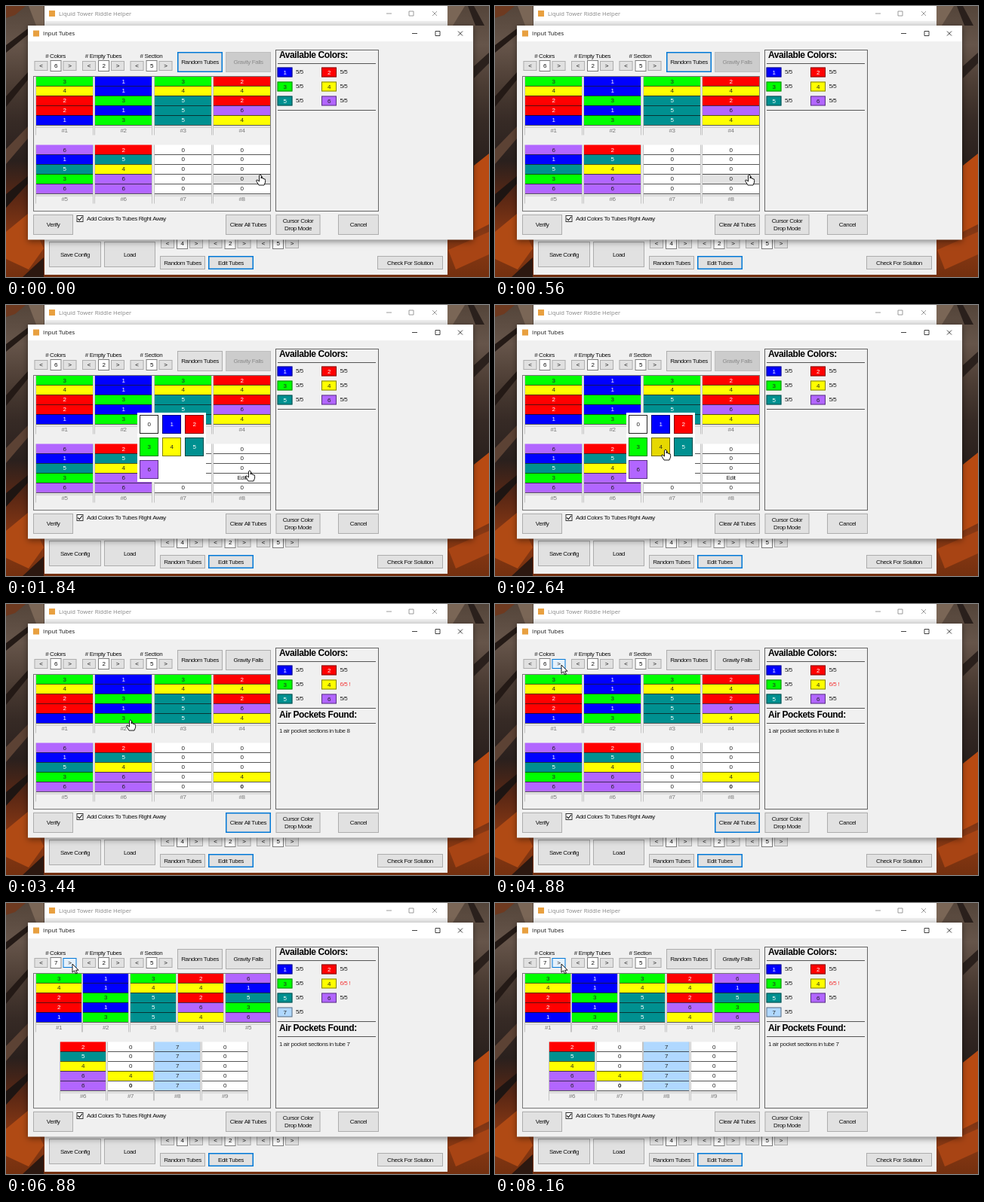
Write an HTML page with a canvas that moves like this. It is 640 px wide and 360 px high and loops after 8400 ms.

```html
<!DOCTYPE html>
<html lang="en">
<head>
<meta charset="utf-8">
<title>Input Tubes</title>
<style>
html, body { margin: 0; width: 100%; height: 100%; overflow: hidden; }
canvas { display: block; width: 640px; height: 360px; }
</style>
</head>
<body>
<canvas id="stage" width="640" height="360"></canvas>
<script>
const ctx = document.getElementById('stage').getContext('2d');
const LOOP = 8400, STEP = 80;
const POPUP_OPEN = 1200, POPUP_CLOSE = 2720, FILLED = 2800, HOVER = 4160, CLICK = 5280, RELAYOUT = 5760, DONE = 6160;
const SANS = '"Liberation Sans", Arial, sans-serif';
const TITLE = '"Open Sans", sans-serif';
const COLORS = ['#fff', '#0000ff', '#ff0000', '#00ff00', '#ffff00', '#009090', '#b266ff', '#b0d8ff'];
const ink = n => [1, 2, 5].includes(n) ? '#fff' : '#222';

function rect(x, y, w, h, fill, stroke, line = 1) {
  if (fill) { ctx.fillStyle = fill; ctx.fillRect(x, y, w, h); }
  if (stroke) {
    ctx.strokeStyle = stroke;
    ctx.lineWidth = line;
    ctx.strokeRect(x + line / 2, y + line / 2, w - line, h - line);
  }
}

function text(s, x, y, { color = '#111', align = 'center', size = 8, weight = '', family = SANS, spacing = -0.4 } = {}) {
  ctx.font = `${weight} ${size}px ${family}`;
  ctx.letterSpacing = spacing + 'px';
  ctx.textAlign = align;
  ctx.textBaseline = 'middle';
  ctx.fillStyle = color;
  ctx.fillText(s, x, y + 0.5);
}

function path(points, fill) {
  ctx.beginPath();
  for (let i = 0; i < points.length; i += 2) ctx.lineTo(points[i], points[i + 1]);
  ctx.closePath();
  ctx.fillStyle = fill;
  ctx.fill();
}

function button(label, x, y, w, h, state = '') {
  const focus = state === 'focus', off = state === 'off', hover = state === 'hover';
  rect(x, y, w, h, off ? '#cccccc' : hover ? '#e5f1fb' : '#e1e1e1',
    focus || hover ? '#0078d7' : off ? '#bfbfbf' : '#adadad', focus ? 1.5 : 1);
  const lines = label.split('\n');
  lines.forEach((s, i) => text(s, x + w / 2, y + h / 2 + (i - (lines.length - 1) / 2) * 9.5,
    { color: off ? '#8c8c8c' : '#111' }));
}

function spinner(x, y, value, hover) {
  button('<', x, y, 18, 13);
  rect(x + 21, y - 1, 15, 15, '#fff', '#7a7a7a');
  text(value, x + 28.5, y + 6.5);
  button('>', x + 38, y, 18, 13, hover ? 'hover' : '');
}

function windowBar(title, x, y, w, h, icon, buttons, color) {
  rect(x, y, w, h, '#fff');
  rect(icon, y + h / 2 - 4, 8, 8, '#e8a040');
  text(title, icon + 13, y + h / 2, { align: 'left', size: 7.7, family: TITLE, color, spacing: 0 });
  const [a, b, c] = buttons, m = y + h / 2;
  ctx.strokeStyle = color;
  ctx.lineWidth = 0.8;
  ctx.beginPath();
  ctx.moveTo(a - 3, m); ctx.lineTo(a + 4, m);
  ctx.rect(b - 3, m - 3, 6, 6);
  ctx.moveTo(c - 3, m - 3); ctx.lineTo(c + 3, m + 3);
  ctx.moveTo(c + 3, m - 3); ctx.lineTo(c - 3, m + 3);
  ctx.stroke();
}

function wallpaper() {
  const g = ctx.createLinearGradient(0, 0, 0, 360);
  ['#54453a', '#66554a', '#4c3d34', '#362a25', '#2a201d', '#5c2814', '#8c3a14', '#74300f']
    .forEach((c, i) => g.addColorStop(i / 7, c));
  rect(0, 0, 640, 360, g);
  path([0, 0, 26, 0, 12, 12, 0, 16], '#6e3a20');
  path([30, 0, 50, 0, 50, 26, 40, 26], '#7a6656');
  path([0, 52, 29, 30, 29, 38, 0, 62], '#241a16');
  path([0, 120, 29, 88, 29, 98, 0, 134], '#241a16');
  path([0, 190, 29, 160, 29, 176, 0, 210], '#5c4234');
  path([0, 250, 29, 226, 29, 236, 0, 268], '#1e1512');
  path([0, 300, 29, 276, 50, 322, 30, 350, 0, 336], '#b04a14');
  path([22, 360, 50, 334, 50, 360], '#2c1810');
  path([585, 0, 608, 0, 592, 26, 585, 26], '#7a6656');
  path([612, 0, 620, 0, 634, 26, 622, 26], '#2a201c');
  path([620, 80, 640, 62, 640, 76, 620, 96], '#2a201c');
  path([620, 212, 640, 196, 640, 290, 620, 300], '#b84a12');
  path([586, 324, 640, 300, 640, 330, 596, 350], '#a84414');
}

function backWindow() {
  rect(51, 0, 534, 357, '#f0f0f0');
  windowBar('Liquid Tower Riddle Helper', 51, 0, 534, 20, 57, [507, 537, 568], '#858585');
  [['4', 205], ['2', 268.5], ['5', 332]].forEach(([v, x]) => spinner(x, 309, v));
  button('Save Config', 57, 313, 69, 34);
  button('Load', 130, 313, 68, 34);
  button('Random Tubes', 204, 332, 60, 18);
  button('Edit Tubes', 268, 332, 60, 18, 'focus');
  button('Check For Solution', 492, 332, 87, 18);
}

function tube(cells, label, x, y, w, center, hot) {
  const pitch = 12.9;
  rect(x - 1, y, 1, 78, '#c4c4c4');
  rect(x + w, y, 1, 78, '#c4c4c4');
  [...cells].forEach((c, i) => {
    const top = y + i * pitch, n = c === 'E' ? 0 : +c;
    rect(x, top, w, pitch, i === hot ? '#e3e3e3' : COLORS[n]);
    text(c === 'E' ? 'Edit' : c, center, top + 6.3,
      { color: ink(n), weight: cells === '00040' && i === 4 ? 'bold' : '' });
  });
  for (let i = 1; i <= cells.length; i++) rect(x, Math.round(y + i * pitch), w, 1, 'rgba(0,0,0,.65)');
  rect(x, y + 67, w, 1, '#c4c4c4');
  if (label) text(label, center, y + 72, { color: '#777' });
}

function tubes(t) {
  const first = ['34221', '11313', '34555', '24264', '61536', '25466'];
  const wide = t < RELAYOUT, loading = !wide && t < DONE;
  let rest;
  if (wide) rest = ['00000', t >= FILLED ? '00040' : t >= POPUP_OPEN ? '000E0' : '00000'];
  else rest = loading ? ['00000', '00040', '00000'] : ['00040', '77777', '00000'];
  const perRow = wide ? 4 : 5, pitch = wide ? 78.6 : 62.9, w = wide ? 75 : 60;
  // Captions keep the old tube width until the new layout has settled.
  const captionWidth = loading ? 75 : w;
  ctx.save();
  ctx.beginPath();
  ctx.rect(37, 94, 313, 178);
  ctx.clip();
  [...first, ...rest].forEach((cells, i) => {
    const low = i >= perRow;
    const x = Math.round((low && !wide ? 71.6 : 39.5) + (i % perRow) * pitch), y = low ? 184.5 : 93.5;
    const partial = i === 8 && loading;
    tube(partial ? '     ' : cells, partial ? '' : '#' + (i + 1), x, y, w, x + captionWidth / 2,
      i === 7 && t < POPUP_OPEN ? 3 : -1);
    if (partial) rect(x, y, 30, 64, 'rgba(240,240,240,.8)');
  });
  if (loading) rect(291, 93, 10, 2, '#f00');
  ctx.restore();
}

function swatch(n, x, y, w, h, fill = COLORS[n]) {
  rect(x, y, w, h, fill, n ? 'rgba(0,0,0,.5)' : '#222');
  text(n, x + w / 2, y + h / 2, { color: ink(n) });
}

function colorPanel(t) {
  const heading = { align: 'left', weight: 'bold', size: 12, color: '#000' };
  const rule = y => rect(360, y, 130, 1, '#555');
  const seven = t >= RELAYOUT, loading = seven && t < DONE, pocket = t >= FILLED;
  rect(357, 58, 137, 215, '#f0f0f0', '#666');
  text('Available Colors:', 362, 65.5, heading);
  rule(76);
  for (let n = 1; n <= (seven ? 7 : 6); n++) {
    const x = n % 2 ? 359.5 : 418, y = 81.5 + Math.floor((n - 1) / 2) * 19;
    if (loading && n > 1) { rect(x, y, 20, 13, '#f0f0f0', '#999'); continue; }
    swatch(n, x, y, 20, 13);
    const over = n === 4 && pocket;
    text(over ? '6/5 !' : '5/5', x + 24.5, y + 6, { align: 'left', color: over ? '#f33b3b' : '#222' });
  }
  const base = seven ? 157 : 138;
  rule(base);
  if (!pocket) return;
  rule(base + 20);
  if (loading) return;
  text('Air Pockets Found:', 362, base + 9.5, heading);
  text(`1 air pocket sections in tube ${seven ? 7 : 8}`, 362, base + 30.5, { align: 'left', color: '#222' });
}

function dialog(t) {
  ctx.save();
  ctx.shadowColor = 'rgba(0,0,0,.45)';
  ctx.shadowBlur = 8;
  ctx.shadowOffsetY = 2;
  rect(29, 26, 590, 284.5, '#f0f0f0');
  ctx.restore();
  windowBar('Input Tubes', 29, 26, 590, 21, 36, [541, 572, 602], '#111');
  const focusClear = t >= POPUP_CLOSE && t < CLICK;
  [['# Colors', t < DONE ? 6 : 7], ['# Empty Tubes', 2], ['# Section', 5]].forEach(([label, v], i) => {
    const x = 37.5 + i * 63.5;
    text(label, x + 28, 66);
    spinner(x, 73, v, i === 0 && t >= HOVER);
  });
  button('Random Tubes', 227, 61, 60, 27, t < 880 ? 'focus' : '');
  button('Gravity Falls', 291, 61, 60, 27, t < FILLED ? 'off' : '');
  rect(36, 93, 315, 180, '#f0f0f0', '#777');
  tubes(t);
  colorPanel(t);
  button('Verify', 36, 277, 53, 27);
  rect(93.5, 278, 9, 9, '#fff', '#333');
  ctx.strokeStyle = '#111';
  ctx.lineWidth = 1.1;
  ctx.beginPath();
  ctx.moveTo(95, 282.3); ctx.lineTo(97.3, 284.6); ctx.lineTo(101, 280);
  ctx.stroke();
  text('Add Colors To Tubes Right Away', 107, 282, { align: 'left' });
  button('Clear All Tubes', 291, 277, 60, 27, focusClear ? 'focus' : '');
  button('Cursor Color\nDrop Mode', 357.5, 277, 59, 27);
  button('Cancel', 440, 277, 54, 27);
}

function popup(hoverYellow) {
  rect(174, 143, 91, 92, '#fff');
  for (let n = 0; n < 7; n++)
    swatch(n, 177 + (n % 3) * 30, 146 + Math.floor(n / 3) * 30, 25, 25, n === 4 && hoverYellow ? '#e6d800' : undefined);
}

const smooth = u => u * u * (3 - 2 * u), easeIn = u => u * u, easeOut = u => u * (2 - u);
const MOVES = [
  [1680, 2400, 337, 224, 226, 192, smooth],
  [2720, 3440, 226, 192, 165, 154, easeIn],
  [3440, 4320, 165, 154, 88, 81, easeOut]
];
const HAND = new Path2D('M-1.5 1Q0-1 1.2 1V5Q2-.2 3 5.3Q4 4 5 6Q6.6 5 6.6 7.5V10L5 14H-2L-5 9Q-6 7 -4 7L-1.5 9Z');
const ARROW = new Path2D('M0 0V11.2L2.6 8.8L4.5 13L6.4 12.2L4.6 8.2H8Z');

function cursor(t) {
  const [t0, t1, x0, y0, x1, y1, ease] = MOVES.findLast(m => t >= m[0]) || MOVES[0];
  const u = ease(Math.min(1, Math.max(0, (t - t0) / (t1 - t0))));
  const x = x0 + (x1 - x0) * u, y = y0 + (y1 - y0) * u;
  const shape = y > 93 ? HAND : ARROW;
  ctx.save();
  ctx.translate(x, y);
  ctx.fillStyle = '#fff';
  ctx.fill(shape);
  ctx.strokeStyle = '#000';
  ctx.lineWidth = 0.9;
  ctx.lineJoin = 'round';
  ctx.stroke(shape);
  ctx.restore();
}

function draw() {
  let t = performance.now() % LOOP;
  t -= t % STEP;
  wallpaper();
  backWindow();
  dialog(t);
  if (t >= POPUP_OPEN && t < POPUP_CLOSE) popup(t >= 2240);
  cursor(t);
  requestAnimationFrame(draw);
}
draw();
</script>
</body>
</html>
```
